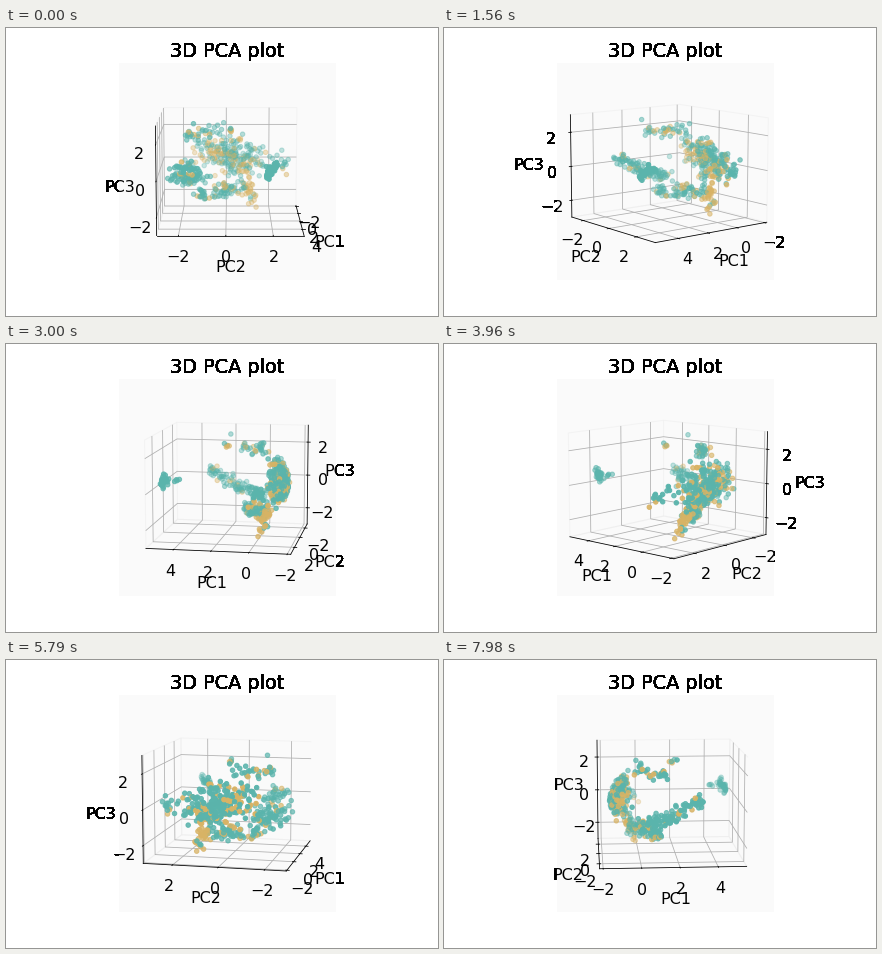
These frames come from a looping animation (432 by 288 pixels, 8 s). A matplotlib script:

```python
import numpy as np
import matplotlib.pyplot as plt
from matplotlib.animation import FuncAnimation

TEAL, TAN = "#5ab4ac", "#d8b365"
LIMITS = np.array([(-2.18, 5.49), (-2.92, 3.30), (-3.0, 3.02)])
BOX = np.array([1.1905, 1.1905, 0.8929])
LOOP, STEP = 8000, 20

plt.rcParams.update({
    "font.family": "DejaVu Sans",
    "font.size": 16,
    "figure.subplot.bottom": 0.125,
    "grid.color": "#b0b0b0",
})
rng = np.random.default_rng(7)


def scatter_along(curve, spread, n, tan):
    """Random points around curve(t), 0 <= t <= 1, with a share of tan ones."""
    t = rng.random(n)
    pts = np.column_stack([np.broadcast_to(c, n) for c in curve(t)])
    pts = pts + rng.normal(0, 1, (n, 3)) * spread
    return pts, np.where(rng.random(n) < tan, TAN, TEAL)


def sheet(n):
    """Bowl hugging the low end of PC1, with more tan towards one side."""
    y = rng.normal(0.03, 0.17, n)
    z = rng.normal(0.05, 0.085, n) - 0.2 * y
    x = -0.5 + 0.4 * y**2 + 2 * z**2 + np.abs(rng.normal(0, 0.06, n))
    tan = rng.random(n) < np.where(y < -0.05, 0.42, 0.17)
    return np.c_[x, y, z], np.where(tan, TAN, TEAL)


groups = [
    sheet(245),
    # middle arm
    scatter_along(lambda t: (-0.25 + 0.5 * t, -0.36, -0.13 + 0.22 * t**2),
                  (0.02, 0.07, 0.025), 105, 0.1),
    # upper arm, the pair above it and the topmost point
    scatter_along(lambda t: (-0.3 + 0.3 * t, -0.4 * t**0.5, 0.3 - 0.03 * t),
                  0.025, 30, 0.2),
    scatter_along(lambda t: (0.03, 0, 0.335), 0.01, 5, 0.8),
    scatter_along(lambda t: (0.05, -0.31, 0.39), 0, 1, 0),
    # lower rim and its tan tail
    scatter_along(lambda t: (-0.32 + 0.24 * t, 0.12 - 0.42 * t, -0.22 - 0.04 * t),
                  0.03, 75, 0.13),
    scatter_along(lambda t: (-0.4 + 0.13 * t, 0.1 + 0.1 * t, -0.05 - 0.32 * t),
                  0.025, 40, 0.9),
    # far cluster and strays
    scatter_along(lambda t: (0.53 - 0.06 * t, 0.3 + 0.07 * t, 0.03 + 0.08 * t),
                  0.014, 34, 0),
    scatter_along(lambda t: (0.42 - 0.05 * t, 0.32, 0.08), 0.01, 4, 0.4),
    scatter_along(lambda t: (-0.4 + 0.22 * t, 0.47, 0.1 - 0.24 * t), 0.02, 11, 0.2),
]
points = np.vstack([g[0] for g in groups])
colors = np.concatenate([g[1] for g in groups])
points = np.clip(points, -0.48 * BOX, 0.48 * BOX)
data = LIMITS.mean(axis=1) + points / BOX * np.ptp(LIMITS, axis=1)


def harden(img, dpi):
    """Give text beyond the axes patch hard edges, on white."""
    ink = img[..., 3:] > 0.06
    out = np.ones_like(img)
    out[..., :3] = np.where(ink, img[..., :3], 1)
    return np.round(out * 255).astype(np.uint8), 0, 0


# The faint background marks every pixel, so the filter sees the whole stage.
fig = plt.figure(figsize=(6, 4), dpi=72, facecolor=(1, 1, 1, 0.01))
fig.set_agg_filter(harden)
ax = fig.add_subplot(projection="3d")
ax.set_facecolor("#fafafa")
ax.scatter(*data.T, c=colors, s=20)
ax.set_title("3D PCA plot")
ax.set(xlim=LIMITS[0], ylim=LIMITS[1], zlim=LIMITS[2],
       xticks=range(-2, 5, 2), yticks=range(-2, 3, 2), zticks=range(-2, 3, 2),
       xlabel="PC1", ylabel="PC2", zlabel="PC3")
for axis in (ax.xaxis, ax.yaxis, ax.zaxis):
    axis.pane.fill = False
    axis.pane.set_edgecolor("#ececec")


def turn(i):
    ax.view_init(elev=10, azim=round(i * STEP / 30))
    return []


anim = FuncAnimation(fig, turn, frames=LOOP // STEP, interval=STEP,
                     init_func=lambda: turn(0), repeat=True, repeat_delay=0)
plt.show()
```
